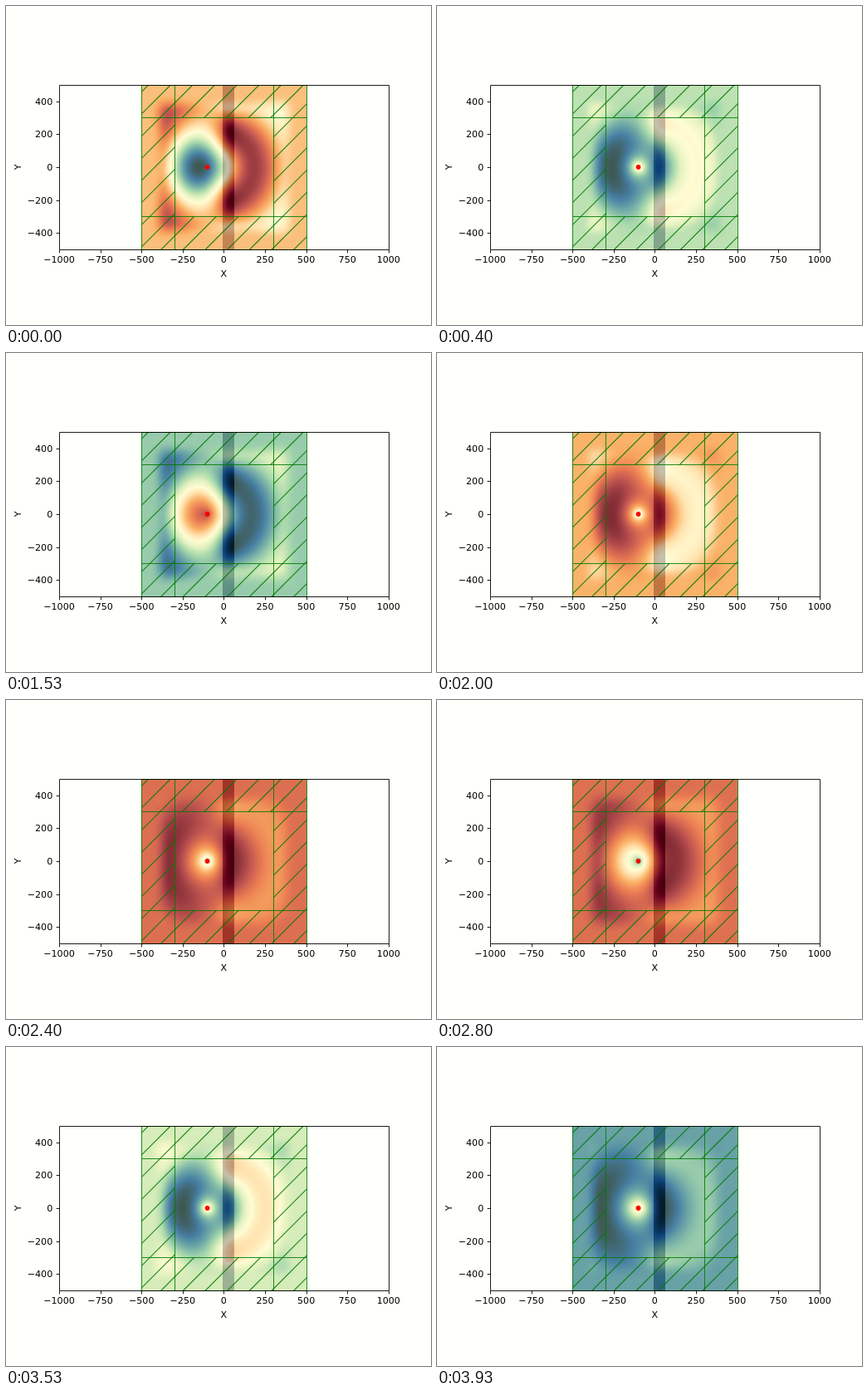
Animation of 512 by 384 pixels, one loop 4000 ms. Source, as an HTML page with a canvas:

```html
<!DOCTYPE html>
<html lang="en">
<head>
<meta charset="utf-8">
<title>Point source beside a slab</title>
<style>
  html, body { margin: 0; width: 512px; height: 384px; overflow: hidden; background: #fffffb; }
  canvas { display: block; }
</style>
</head>
<body>
<canvas id="stage" width="512" height="384"></canvas>
<script>
const ctx = document.getElementById('stage').getContext('2d');

// Plot coordinates
const SCALE = 0.1984, CX = 262.4, CY = 193.92;
const toX = v => CX + v * SCALE;
const toY = v => CY - v * SCALE;
const snap = p => Math.floor(p + 0.5) + 0.5;

// Wave simulation: split-field FDTD with absorbing layers
const N = 101, MID = 50, CELL = 10, PERIOD = 120;
const SOURCE = 40 * N + MID;
const SLAB_EPS = 4;

function lossAt(index) {
  const depth = Math.max(0, Math.abs(index - MID) * CELL - 300) / 200;
  const q = 0.45 * depth * depth;
  return { keep: (1 - q) / (1 + q), gain: 0.5 / (1 + q) };
}

function solveWave() {
  const field = () => new Float64Array(N * N);
  const e = field(), ex = field(), ey = field(), hx = field(), hy = field();
  const node = Array.from({ length: N }, (_, i) => lossAt(i));
  const half = Array.from({ length: N }, (_, i) => lossAt(i + 0.5));
  const omega = 2 * Math.PI / PERIOD;

  function step(n) {
    for (let i = 0; i < N - 1; i++) {
      for (let j = 0; j < N - 1; j++) {
        const p = i * N + j;
        hy[p] = half[i].keep * hy[p] + half[i].gain * (e[p + N] - e[p]);
        hx[p] = half[j].keep * hx[p] - half[j].gain * (e[p + 1] - e[p]);
      }
    }
    const ramp = Math.sin(Math.PI / 2 * Math.min(1, n / (2 * PERIOD))) ** 2;
    const drive = ramp * Math.cos(omega * (n + 0.5)) / 2;
    for (let i = 1; i < N - 1; i++) {
      const eps = i >= MID && i <= MID + 6 ? SLAB_EPS : 1;
      for (let j = 1; j < N - 1; j++) {
        const p = i * N + j;
        ex[p] = node[i].keep * ex[p] + node[i].gain / eps * (hy[p] - hy[p - N]);
        ey[p] = node[j].keep * ey[p] - node[j].gain / eps * (hx[p] - hx[p - 1]);
        if (p === SOURCE) { ex[p] += drive; ey[p] += drive; }
        e[p] = ex[p] + ey[p];
      }
    }
  }

  let n = 0;
  while (n < 8 * PERIOD) step(n++);
  const inPhase = e.slice();
  while (n < 8.25 * PERIOD) step(n++);
  return [inPhase, e.slice()];
}

const [inPhase, quadrature] = solveWave();

// Colours from low to high
const STOPS = [
  [128, 42, 52], [188, 82, 80], [234, 124, 82], [249, 173, 98], [255, 222, 168], [255, 252, 212],
  [226, 241, 190], [167, 216, 172], [115, 172, 167], [70, 126, 163], [62, 88, 82]
];
const SHADE = [58, 60, 40];
const palette = Array.from({ length: 256 }, (_, n) => {
  const pos = n / 255 * 10, i = Math.min(9, Math.floor(pos)), f = pos - i;
  return STOPS[i].map((c, k) => c + (STOPS[i + 1][k] - c) * f);
});

const LEFT = 163, TOP = 95, WIDTH = 199, HEIGHT = 198;
const SLAB_LEFT = 261, SLAB_RIGHT = 275;
const image = ctx.createImageData(WIDTH, HEIGHT);
const wave = new Float64Array(N * N);

function gridSpot(units) {
  const pos = Math.min(N - 1, Math.max(0, units / CELL + MID));
  const i = Math.min(N - 2, Math.floor(pos));
  return [i, pos - i];
}
const columns = Array.from({ length: WIDTH }, (_, x) => gridSpot((LEFT + x + 0.5 - CX) / SCALE));
const rows = Array.from({ length: HEIGHT }, (_, y) => gridSpot((CY - TOP - y - 0.5) / SCALE));

function drawWave(phase) {
  const c = Math.cos(phase), s = Math.sin(phase);
  let low = Infinity, high = -Infinity;
  for (let p = 0; p < wave.length; p++) {
    const v = wave[p] = inPhase[p] * c + quadrature[p] * s;
    if (v < low) low = v;
    if (v > high) high = v;
  }
  const gain = 255 / (high - low);
  let out = 0;
  for (const [j, fy] of rows) {
    for (let x = 0; x < WIDTH; x++) {
      const [i, fx] = columns[x], p = i * N + j;
      const a = wave[p] + (wave[p + 1] - wave[p]) * fy;
      const b = wave[p + N] + (wave[p + N + 1] - wave[p + N]) * fy;
      const color = palette[Math.round((a + (b - a) * fx - low) * gain)];
      const inSlab = LEFT + x >= SLAB_LEFT && LEFT + x < SLAB_RIGHT;
      for (let k = 0; k < 3; k++) image.data[out++] = color[k] - (inSlab ? SHADE[k] : 0);
      image.data[out++] = 255;
    }
  }
  ctx.putImageData(image, LEFT, TOP);
}

function line(x1, y1, x2, y2) {
  ctx.moveTo(x1, y1);
  ctx.lineTo(x2, y2);
}

function drawAbsorber() {
  const [x0, x1, x2, x3] = [-500, -300, 300, 500].map(v => snap(toX(v)));
  const [y0, y1, y2, y3] = [500, 300, -300, -500].map(v => snap(toY(v)));
  ctx.strokeStyle = 'rgba(0, 122, 0, 0.85)';
  ctx.lineWidth = 1.1;

  ctx.save();
  ctx.beginPath();
  ctx.rect(x0, y0, x3 - x0, y3 - y0);
  ctx.rect(x1, y1, x2 - x1, y2 - y1);
  ctx.clip('evenodd');
  ctx.beginPath();
  for (let sum = 0; sum < 700; sum += 80 / 3) line(sum - y0, y0, sum - y3, y3);
  ctx.stroke();
  ctx.restore();

  ctx.lineWidth = 1;
  ctx.beginPath();
  for (const x of [x0, x1, x2, x3]) line(x, y0, x, y3);
  for (const y of [y0, y1, y2, y3]) line(x0, y, x3, y);
  ctx.stroke();
}

const label = v => String(v).replace('-', '\u2212');

function drawAxes() {
  const left = snap(toX(-1000)), right = snap(toX(1000));
  const top = snap(toY(500)), bottom = snap(toY(-500));
  ctx.strokeStyle = ctx.fillStyle = '#000';
  ctx.lineWidth = 0.89;
  ctx.font = '11.11px "DejaVu Sans", sans-serif';
  ctx.beginPath();
  ctx.rect(left, top, right - left, bottom - top);
  ctx.textAlign = 'center';
  for (let v = -1000; v <= 1000; v += 250) {
    line(snap(toX(v)), bottom, snap(toX(v)), bottom + 3.9);
    ctx.fillText(label(v), toX(v), 309.2);
  }
  ctx.textAlign = 'right';
  for (let v = -400; v <= 400; v += 200) {
    line(left, snap(toY(v)), left - 3.9, snap(toY(v)));
    ctx.fillText(label(v), 56.2, toY(v) + 4.2);
  }
  ctx.stroke();

  ctx.textAlign = 'center';
  ctx.fillText('X', CX, 326);
  ctx.save();
  ctx.translate(18, CY);
  ctx.rotate(-Math.PI / 2);
  ctx.fillText('Y', 0, 0);
  ctx.restore();
}

function draw(step) {
  ctx.fillStyle = '#fffffb';
  ctx.fillRect(0, 0, 512, 384);
  drawWave(0.2 * step - 0.03);
  drawAbsorber();
  ctx.fillStyle = '#f00';
  ctx.beginPath();
  ctx.arc(toX(-100), CY, 2.8, 0, 2 * Math.PI);
  ctx.fill();
  drawAxes();
}

// Forty steps per loop, alternately 130 and 70 ms long
function stepAt(time) {
  const t = time % 4000, n = Math.floor(t / 100);
  return n % 2 && t % 100 < 30 ? n - 1 : n;
}

let shown = -1;
const start = performance.now();
function tick() {
  const step = stepAt(performance.now() - start);
  if (step !== shown) draw(shown = step);
  requestAnimationFrame(tick);
}
tick();
</script>
</body>
</html>
```
